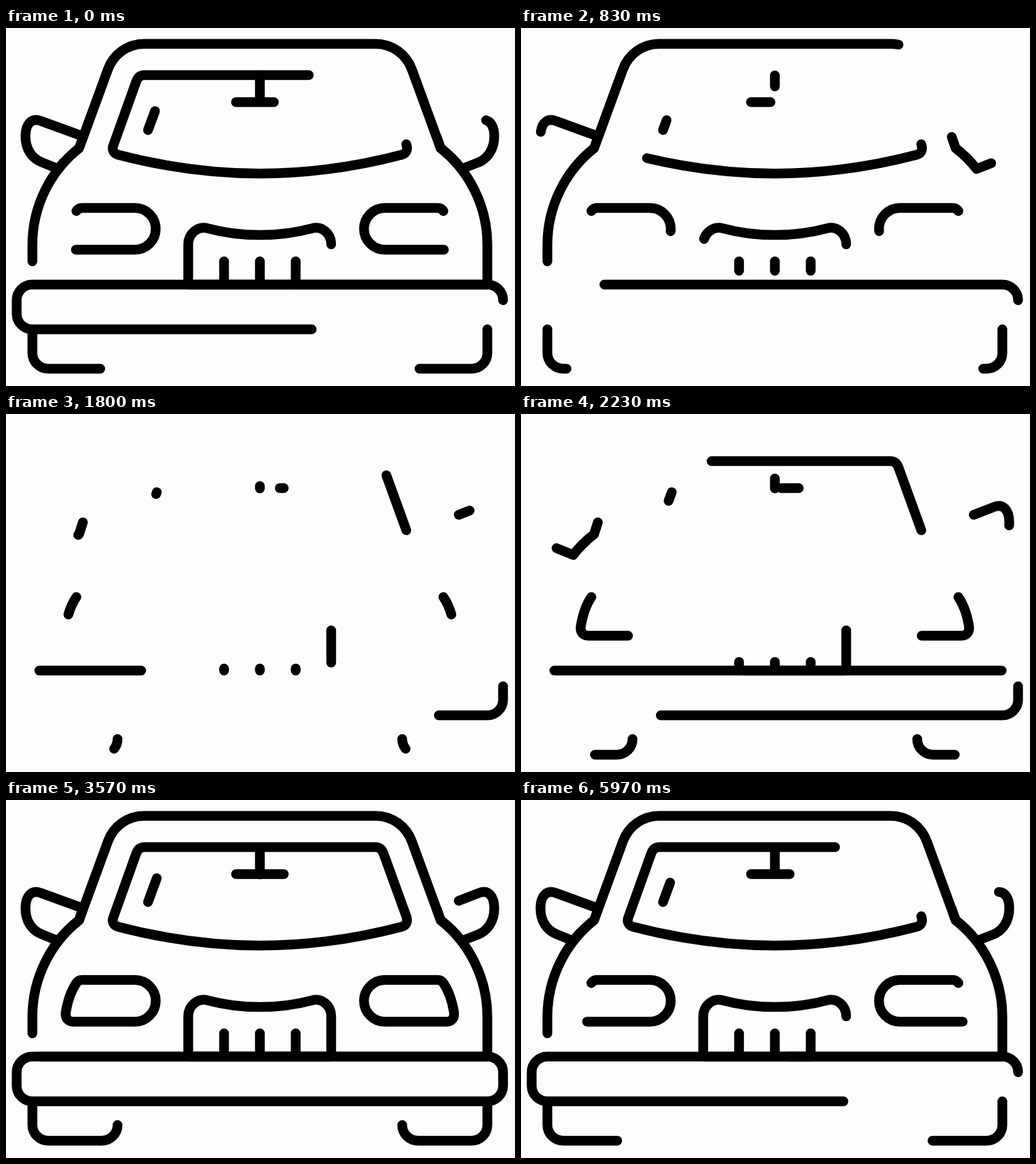
An HTML page that plays this animation: 810 by 570 pixels, repeating every 6.01 s.

```html
<!DOCTYPE html>
<html lang="en">
<head>
<meta charset="utf-8">
<title>Car line drawing</title>
<style>
  html, body { margin: 0; width: 100%; height: 100%; overflow: hidden; background: #fdfdfb; }
  svg { display: block; width: 810px; height: 570px; }
  path { fill: none; stroke: #000; stroke-width: 15.5; stroke-linecap: round; stroke-linejoin: round; }
</style>
</head>
<body>
<svg id="stage" viewBox="0 -0.4 810 570"></svg>
<script>
const LOOP = 6010;
const stage = document.getElementById('stage');

const lamp = 'M112 291C114 288 117 286 121 286H205A33.3 33.3 0 0 1 205 352.6H107C99 352.6 94 347 95 338C98 320 103 304 112 291';
const wheel = 'M42 479.3V517A25 25 0 0 0 67 542H152A25 25 0 0 0 177.5 517';
const slat = x => `M${x} 371V408`;

const shapes = {
  body: 'M42 371V345C42 282 72 226 116.3 191L162 66C171 41 194 24.8 220 24.8H588C614 24.8 637 41 646 66L691.7 191C736 226 766 282 766 345V408H53',
  window: 'M637 184.7C640 193 637 199 631 201C555 221 480 231.3 404 231.3S253 221 177 201C171 199 168 193 171 186L207.5 84C210 78 214 74.7 220 74.7H588C594 74.7 598 78 600.5 84L637 184.7',
  leftMirror: 'M122.3 172L55 147.5C41 142 31 152 31 172C31 192 41 207 56 213L83 224Q97 206 116.3 191L122.3 172',
  rightMirror: 'M685.5 173L691.7 191Q711 206 725 224L752 213.5C767 207 777 192 777 172C777 152 767 142 753 147.5L720.5 160',
  stem: 'M404 75V118',
  bar: 'M366 117.6H442',
  glint: 'M226 162L240 124',
  grille: 'M517.5 344C517.5 327 503 314.5 487 318.5C459 326 432 329.2 404 329.2S349 326 321 318.5C305 314.5 290 327 290 344V408H517.5V344',
  bumper: 'M791 433A24.8 24.8 0 0 0 766 408H42A24.8 24.8 0 0 0 17 433V455A24.8 24.8 0 0 0 42 479.3H766A24.8 24.8 0 0 0 791 455V433',
  slats: [347, 404, 461].map(slat),
  lamps: lamp,
  wheels: wheel
};

const lines = [];
function addLine(d, mirrored) {
  const path = document.createElementNS('http://www.w3.org/2000/svg', 'path');
  path.setAttribute('d', d);
  path.setAttribute('pathLength', 100);
  if (mirrored) path.setAttribute('transform', 'matrix(-1 0 0 1 808 0)');
  stage.appendChild(path);
  lines.push(path);
}
Object.values(shapes).flat().forEach(d => addLine(d));
[lamp, wheel].forEach(d => addLine(d, true));

// Time in seconds, travel, speed. Travel 0 to 1 erases, 1 to 2 draws again.
const keys = [
  [-0.94, 0, 0], [0, 0.206, 0.41], [0.83, 0.5913, 0.475], [1.37, 0.8493, 0.49],
  [2.23, 1.366, 0.72], [2.53, 1.59, 0.76], [3.17, 2, 0.2]
];

function travelAt(t) {
  const i = keys.findIndex(k => t < k[0]);
  if (i < 1) return 2;
  const [t0, g0, v0] = keys[i - 1], [t1, g1, v1] = keys[i];
  const d = t1 - t0, u = (t - t0) / d, w = 1 - u;
  return w * w * ((1 + 2 * u) * g0 + u * d * v0) + u * u * ((1 + 2 * w) * g1 - w * d * v1);
}

function render(ms) {
  let t = (ms % LOOP) / 1000;
  if (t > LOOP / 1000 - 0.94) t -= LOOP / 1000;
  const travel = Math.min(2, Math.max(0, travelAt(t)));
  const shown = Math.abs(1 - travel) * 100;
  const offset = travel > 1 ? shown - 100 : 0;
  stage.style.visibility = shown < 0.2 ? 'hidden' : 'visible';
  for (const line of lines) {
    line.setAttribute('stroke-dasharray', `${shown} 200`);
    line.setAttribute('stroke-dashoffset', offset);
  }
}

const start = performance.now();
function tick() {
  render(performance.now() - start);
  requestAnimationFrame(tick);
}
tick();
</script>
</body>
</html>
```
